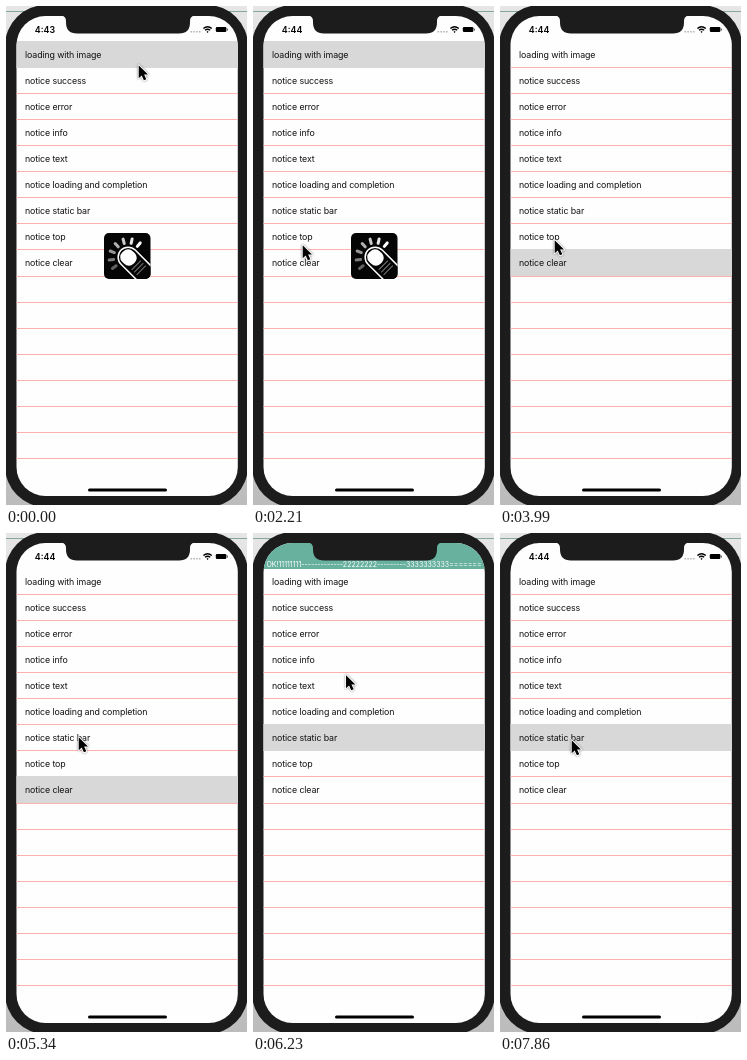
Recreate the animation shown at these times as an HTML page. Size 241 by 499 pixels, loop 8 s.

```html
<!DOCTYPE html>
<html lang="en">
<head>
<meta charset="utf-8">
<title>Notice demo</title>
<style>
  html, body { margin: 0; width: 100%; height: 100%; overflow: hidden; background: #ddd; }
  svg { display: block; width: 241px; height: 499px; }
  text { font-family: Inter, "Liberation Sans", sans-serif; }
  .row { font-size: 8.85px; letter-spacing: -.014em; fill: #111; }
  .clock { font-size: 8.9px; font-weight: 600; fill: #000; }
  .bar text { font-size: 7px; fill: #fff; text-anchor: middle; }
  #cursor { filter: drop-shadow(0 .8px .8px #0007); }
</style>
</head>
<body>
<svg viewBox="0 0 241 499">
  <defs>
    <clipPath id="screen"><rect x="10.5" y="10" width="221.3" height="480" rx="29"/></clipPath>
    <clipPath id="tile"><rect x="98" y="227" width="46.5" height="46" rx="5"/></clipPath>
    <linearGradient id="desk" x2="0" y2="1">
      <stop stop-color="#e6e6e6"/><stop offset="1" stop-color="#bcbcbc"/>
    </linearGradient>
  </defs>

  <rect width="241" height="499" fill="url(#desk)"/>
  <rect y="5" width="241" height="1" fill="#86a79d"/>
  <rect x="-1" y="-1" width="243" height="502" rx="41" fill="#1c1c1c"/>

  <g clip-path="url(#screen)">
    <rect x="10" y="10" width="223" height="481" fill="#fefefe"/>
    <g id="lines"></g>
    <rect id="pick" x="10" width="223" height="27" fill="#d8d8d8"/>
    <g id="labels"></g>

    <text id="clock" class="clock" x="28.8" y="26.6"></text>
    <path d="M184.5 25.7H195" stroke="#b5b5b5" stroke-width="1.4" stroke-dasharray="1.6 1.2"/>
    <g fill="none" stroke="#000" stroke-width="1.4">
      <path d="M197.4 22.5q4.2-3.6 8.4 0M199 24.3q2.6-2.2 5.2 0"/>
      <circle cx="201.6" cy="25.9" r=".5" stroke-width="1"/>
    </g>
    <rect x="209.8" y="21" width="10.6" height="5" rx="1.2" fill="#000"/>
    <rect x="221" y="22.6" width=".9" height="2" fill="#555"/>

    <g id="bar" class="bar">
      <rect x="10" y="10" width="223" height="26" fill="#69b19f"/>
      <text x="121" y="34.3"></text>
    </g>

    <g id="icon" clip-path="url(#tile)">
      <rect x="98" y="227" width="47" height="47" fill="#050505"/>
      <g id="rays" stroke-width="3" stroke-linecap="round"></g>
      <g transform="translate(122.5 251.5) rotate(45)">
        <rect x="-10.5" y="-10" width="60" height="20" rx="10" fill="#050505" stroke="#fff" stroke-width="1.5"/>
        <rect x="-8" y="-7.5" width="16" height="15" rx="6.5" fill="#fff"/>
        <path d="M11 -6.5V6.5M14.5 -6.5V6.5M18 -6.5V6.5" stroke="#777"/>
      </g>
    </g>
  </g>

  <path d="M55 9.5q5 .5 5 5.5v1.5q0 11 11 11h102q11 0 11-11v-1.5q0-5 5-5.5z" fill="#1c1c1c"/>
  <rect x="82" y="482.4" width="79" height="3" rx="1.5" fill="#000"/>
  <g id="cursor">
    <path d="M.7 1.2V14.2L3.7 11.4L5.9 16.3L8.3 15.3L6.1 10.5H10Z"
          fill="#000" stroke="#fff" stroke-width="1.8" stroke-linejoin="round" paint-order="stroke"/>
  </g>
</svg>

<script>
const $ = id => document.getElementById(id);
const add = (parent, tag, attrs, text = '') => {
  const el = document.createElementNS('http://www.w3.org/2000/svg', tag);
  for (const k in attrs) el.setAttribute(k, attrs[k]);
  el.textContent = text;
  parent.append(el);
  return el;
};
const clamp = v => Math.min(1, Math.max(0, v));

const LOOP = 8000, STEPS = 54;
const items = ['loading with image', 'notice success', 'notice error', 'notice info', 'notice text',
  'notice loading and completion', 'notice static bar', 'notice top', 'notice clear'];
const lineY = k => Math.round(61 + 26.07 * k);

for (let k = 0; k < 16; k++)
  add($('lines'), 'rect', { x: 10, y: lineY(k), width: 223, height: 1, fill: '#fcb1af' });
items.forEach((s, k) => add($('labels'), 'text', { class: 'row', x: 19, y: 52.2 + 26 * k }, s));

$('bar').querySelector('text').textContent = 'OK!' + '1'.repeat(8) + '-'.repeat(13) +
  '2'.repeat(8) + '-'.repeat(9) + '3'.repeat(10) + '='.repeat(7);

const rays = Array.from({ length: 7 }, (_, k) => add($('rays'), 'path', {
  d: 'M14.5 0H19',
  transform: `translate(122 251.5) rotate(${145 + k * 27.5})`
}));

// Pointer moves: first step, last step, end x, end y
const moves = [
  [0, 6, 185, 307], [6, 9, 166, 272], [9, 12, 55, 198], [12, 15, 46, 258],
  [22, 24, 65, 207], [24, 25, 54, 233], [33, 36, 72, 203], [39, 48, 133, 17], [48, 53, 71, 206]
];
const pointAt = i => moves.reduce(([x, y], [from, to, x2, y2]) => {
  const f = clamp((i - from) / (to - from));
  return [x + (x2 - x) * f, y + (y2 - y) * f];
}, [132, 58]);

function draw(now) {
  const i = Math.floor((now % LOOP + 8) * STEPS / LOOP) % STEPS;

  $('cursor').setAttribute('transform', `translate(${pointAt(i)})`);
  $('clock').textContent = i < 5 ? '4:43' : '4:44';

  const row = i < 17 ? 0 : i < 39 ? 8 : 6;
  $('pick').setAttribute('y', lineY(row - 1));

  $('icon').style.display = i < 18 ? '' : 'none';
  const head = 6 + 2 * Math.floor((i + 1) / 2);
  rays.forEach((r, k) => {
    const v = 255 - 26 * ((head - k) % 7);
    r.setAttribute('stroke', `rgb(${v},${v},${v})`);
  });

  const show = clamp((i - 38.5) / 2), hide = clamp((i - 46.5) / 3);
  $('bar').setAttribute('transform', `translate(0 ${-26 * (1 - show + hide)})`);
  $('bar').setAttribute('opacity', show > 0 ? 1 - hide * .9 : 0);
}

const start = performance.now();
const tick = () => {
  draw(performance.now() - start);
  requestAnimationFrame(tick);
};
tick();
</script>
</body>
</html>
```
